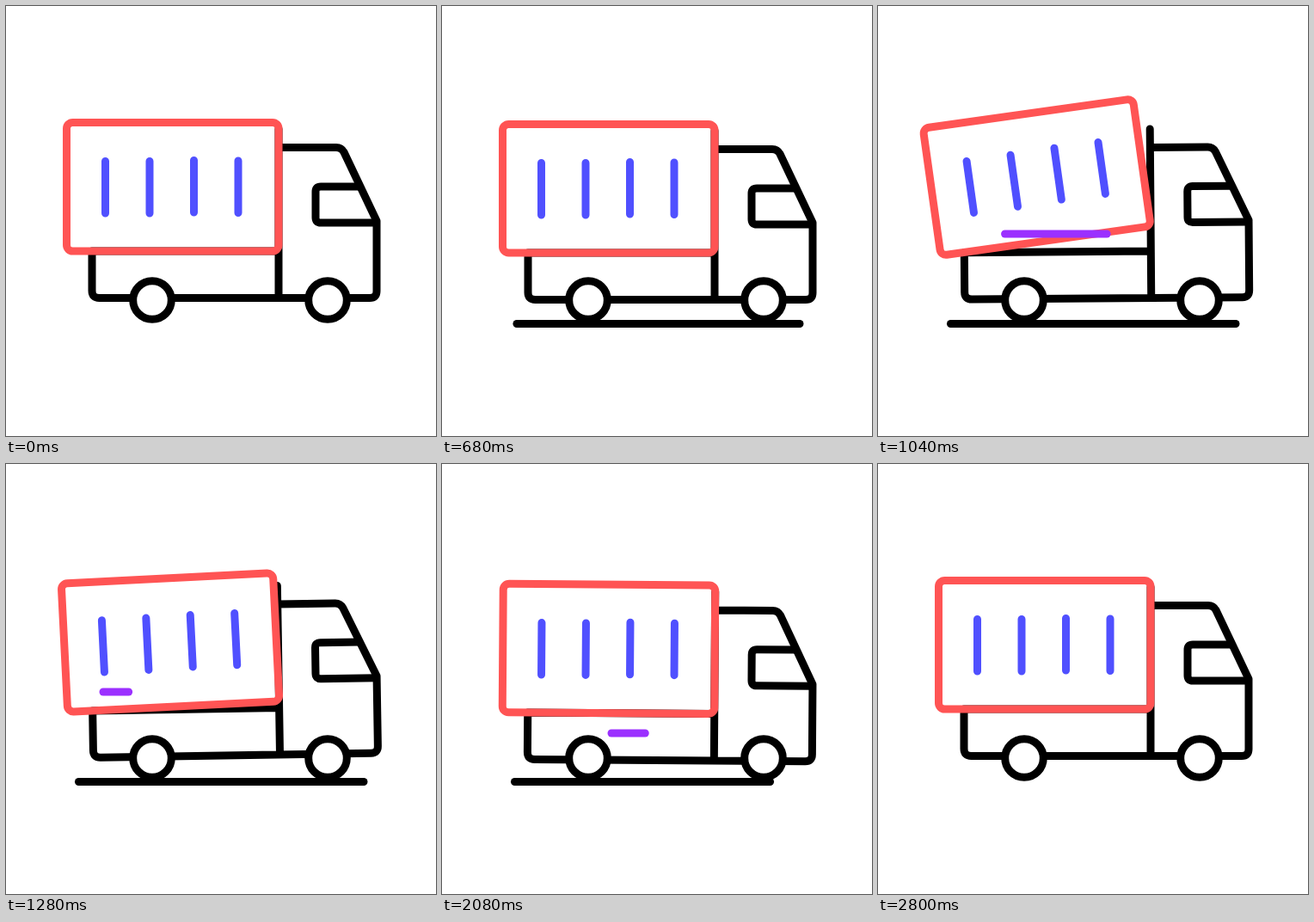
Animation of 500x500 px, one loop 3 s. Source, as an HTML page:

```html
<!DOCTYPE html>
<html lang="en">
<head>
<meta charset="utf-8">
<title>Delivery truck</title>
<style>
  html, body { margin: 0; height: 100%; overflow: hidden; background: #fff; }
  svg { display: block; width: 100vw; height: 100vh; }
</style>
</head>
<body>
<svg viewBox="0 0 500 500" fill="none" stroke="#000" stroke-width="9" stroke-linecap="round" stroke-linejoin="round">
  <g id="body">
    <path d="M100 285V331q0 8.500 8.500 8.500H423q8 0 8-8V250L393 170q-3-5.500-9-5.500H317M100 285H317M317 143V339"/>
    <path d="M411 210H366q-6 0-6 6V246q0 6 6 6H430"/>
    <g id="box">
      <rect x="70.5" y="135.5" width="246.5" height="149.5" rx="7" stroke="#ff5454"/>
      <path d="M115.5 180.5V241M167 180.5V241M218.5 179.5V240M270 180V240.5" stroke="#5050ff"/>
    </g>
  </g>
  <g fill="#fff">
    <circle cx="170" cy="342" r="22.3"/>
    <circle cx="374" cy="342" r="22.3"/>
  </g>
  <g id="streaks"></g>
</svg>
<script>
const LOOP = 3000, STEP = 40, TRIM = 400;
const PURPLE = '#9b30ff';
const body = document.getElementById('body');
const box = document.getElementById('box');

// Lines drawn from right to left, then erased from the same end
const streaks = [
  { y: 369.5, from: 416, to: 84.5, grow: 300, shrink: 2000, color: '#000' },
  { y: 265, from: 273, to: 113, grow: 760, shrink: 990, color: PURPLE },
  { y: 189, from: 380, to: 244, grow: 1464, shrink: 1660, color: PURPLE },
  { y: 313, from: 333, to: 197, grow: 1588, shrink: 1822, color: PURPLE }
].map(streak => {
  const el = document.createElementNS('http://www.w3.org/2000/svg', 'path');
  el.setAttribute('stroke', streak.color);
  document.getElementById('streaks').append(el);
  return { ...streak, el };
});

// Keyframes as [time, value]
const lift = [[560, 0], [690, 2], [850, 0], [1040, 0.5], [1200, -1], [1400, 0.5],
  [1640, -1], [1840, 0], [2080, 5], [2320, -1.6], [2600, 0]];
const tilt = [[900, 0], [1040, -0.45], [1180, -1.2], [1500, 0], [1960, 0],
  [2080, 0.4], [2300, 1.05], [2600, 0]];
const swing = [[720, 0], [1040, -7.55], [1400, 0]];

function ease(p) {
  p = Math.min(1, Math.max(0, p));
  return p * p * (3 - 2 * p);
}

function valueAt(keys, t) {
  let value = keys[0][1];
  for (let i = 1; i < keys.length; i++) {
    const [t0, v0] = keys[i - 1], [t1, v1] = keys[i];
    if (t >= t0) value = v0 + (v1 - v0) * ease((t - t0) / (t1 - t0));
  }
  return value;
}

function drawStreak({ el, y, from, to, grow, shrink }, t) {
  const at = start => from + (to - from) * ease((t - start) / TRIM);
  const visible = t > grow && t < shrink + TRIM;
  el.setAttribute('d', visible ? `M${at(shrink)} ${y}H${at(grow)}` : '');
}

function draw(now) {
  const t = Math.floor(now % LOOP / STEP) * STEP;
  body.setAttribute('transform', `translate(0 ${valueAt(lift, t)}) rotate(${valueAt(tilt, t)} 250 245)`);
  box.setAttribute('transform', `rotate(${valueAt(swing, t)} 97 270)`);
  streaks.forEach(streak => drawStreak(streak, t));
}

const start = performance.now();
function tick() {
  draw(performance.now() - start);
  requestAnimationFrame(tick);
}
tick();
</script>
</body>
</html>
```
